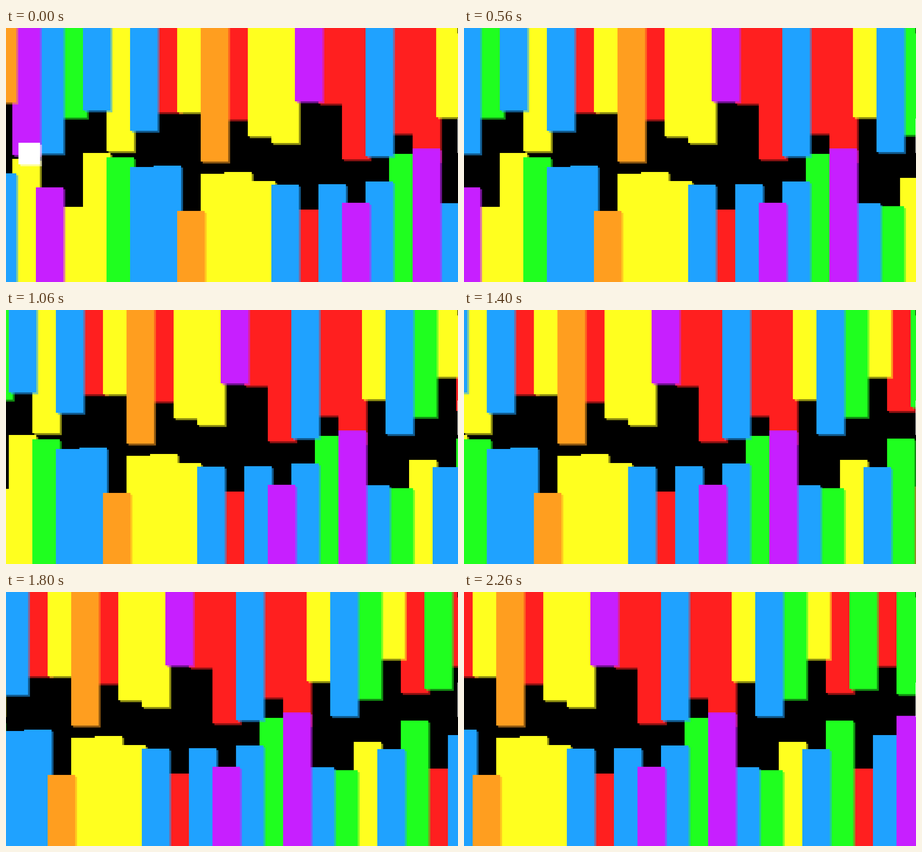
Animation, 998 px wide and 561 px high, one loop 2.34 s. Source, as an HTML page:

```html
<!DOCTYPE html>
<html lang="en">
<head>
<meta charset="utf-8">
<title>Scrolling bars</title>
<style>
html, body { margin: 0; width: 100%; height: 100%; overflow: hidden; background: #000; }
svg { display: block; width: 998px; height: 561px; }
</style>
</head>
<body>
<svg viewBox="0 0 998 561"><g id="world"></g></svg>
<script>
const LOOP = 2340;
const H = 561;
const PITCH = 51.99, WIDTH = 60.7, SHADOW = 4.3, TICK = 2.6;
const FIRST_X = -38;

// Listed from the back layer to the front one
const COLORS = {
  r: '#ff1f1f', y: '#ffff1f', g: '#1fff1f',
  b: '#1fa2ff', p: '#c71fff', o: '#ff9e1f'
};

const ceiling = {
  hues: 'opbgbybryoryyprrbrrybgyrgrg',
  ends: [164.5, 280.5, 277, 198, 182, 272, 227, 186, 186, 295, 202, 239, 254, 162,
    167, 290, 283, 233, 294, 197, 274, 236, 147.5, 223, 214, 163, 225.5]
};
const floor = {
  hues: 'bypyygbboyyybrbpbgpbgybgrbp',
  ends: [321, 289, 352, 395, 276, 285.5, 307, 304, 404, 322, 318, 338, 346, 401,
    345, 386, 339, 278, 266, 387, 393.5, 331, 347, 284, 390, 316, 273.5]
};

// Moments at which the held picture advances
const STEPS = [70, 140, 200, 270, 330, 410, 490, 560, 640, 710, 790, 870, 960, 1060, 1110,
  1170, 1250, 1330, 1400, 1480, 1560, 1630, 1720, 1800, 1880, 1950, 2030, 2110, 2180, 2260];

const world = document.getElementById('world');

function rect(parent, x, y, w, h, fill, opacity = 1) {
  const el = document.createElementNS('http://www.w3.org/2000/svg', 'rect');
  const attrs = { x, y, width: w, height: h, fill, 'fill-opacity': opacity };
  for (const key in attrs) el.setAttribute(key, attrs[key]);
  parent.append(el);
}

function block(x, y, w, h, fill) {
  rect(world, x + SHADOW, y + SHADOW, w, h, fill, 0.55);
  rect(world, x, y, w, h, fill);
}

for (const hue in COLORS) {
  for (const row of [ceiling, floor]) {
    row.ends.forEach((end, i) => {
      if (row.hues[i] !== hue) return;
      const x = FIRST_X + i * PITCH;
      if (row === ceiling) block(x, -20, WIDTH, end + 20, COLORS[hue]);
      else block(x, end, WIDTH, H + 20 - end, COLORS[hue]);
    });
  }
}
block(27.5, 253.5, 47.6, 47.6, '#fff');

// Fixed marks along the right edge
rect(world.parentNode, 997, 0, 1, 12, '#000');
rect(world.parentNode, 997, 200, 1, 76, '#fff');

function draw(time) {
  const step = STEPS.filter(t => t <= time).length;
  const ticks = Math.round(step < 5 ? 4.2 * step : 4.67 * step - 2.3);
  world.setAttribute('transform', `translate(${-ticks * TICK} 0)`);
}

let start = null;
function frame(now) {
  if (start === null) start = now;
  draw((now - start) % LOOP);
  requestAnimationFrame(frame);
}
draw(0);
requestAnimationFrame(frame);
</script>
</body>
</html>
```
